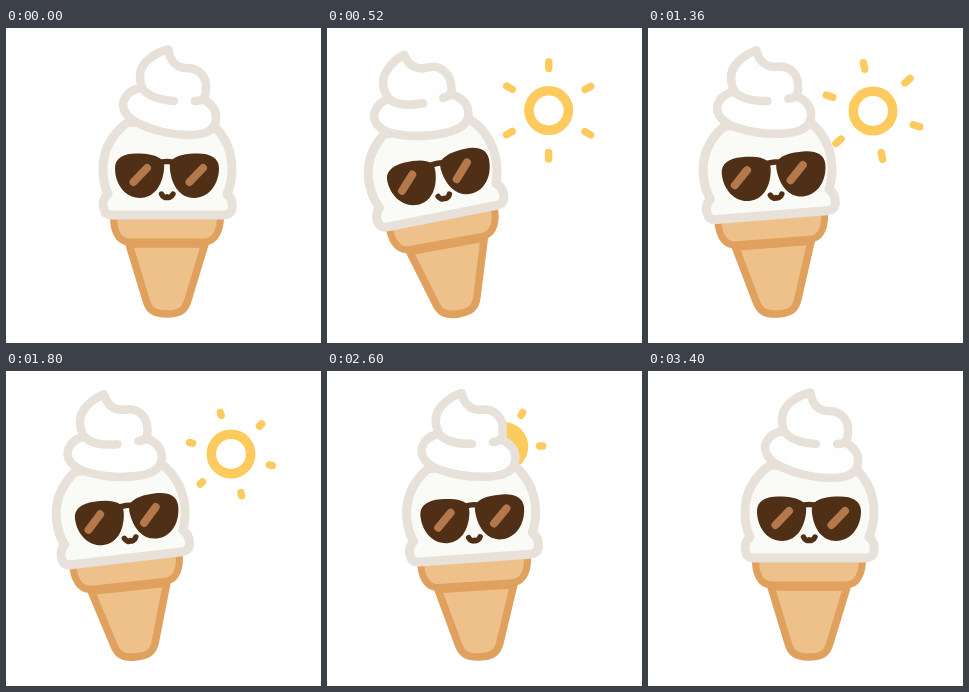
An HTML page with a canvas for the animation above (3440 ms loop, 315 px wide and 315 px high).

```html
<!DOCTYPE html>
<html lang="en">
<head>
<meta charset="utf-8">
<title>Ice cream and sun</title>
<style>
html, body { margin: 0; width: 100%; height: 100%; overflow: hidden; background: #fff; }
canvas { display: block; width: 100vw; height: 100vh; }
</style>
</head>
<body>
<canvas id="stage"></canvas>
<script>
const SIZE = 315, LOOP = 3440, AXIS = 160, GROUND = 288;
const CREAM = '#e8e1da', SUN = '#fdca5d', SHADES = '#4f2f15', GLINT = '#b5784a';
const WAFER = '#eec08a', CRUST = '#dfa15d';

const canvas = document.getElementById('stage');
const ctx = canvas.getContext('2d');

// Shapes of the upright cone; control points are bent before drawing.
const shapes = {
  wafer: 'M123 216 L140 272 C143 283 149 286 161 286 C173 286 179 283 182 272 L199 216 Z',
  rim: 'M107.5 186 C107 201 111 214 124 214 L198 214 C210 214 215 201 214.5 186 Z',
  body: 'M122 94 C106 106 97 121 97 141 C97 152 99 160 102 166 C97 170 96 177 98 182 C99 186 102 187 106 187 L217 187 C222 187 225 185 226 181 C227 175 226 170 221 166 C224 159 226 150 226 141 C226 122 218 107 206 96 Z',
  swirl: 'M162.5 21.5 C164 34 171 40 181 40 C194 40 201 50 200 60 C200 65 199 69 197 71 C206 76 211 82 210 91 C209 103 199 107 184 107 C163 107 142 101 128 93 C119 87 114 78 119 70 C122 64 128 61 136 60 C132 48 134 38 143 31 C149 26 155 23 162.5 21.5 Z',
  fold: 'M136 60 C142 69 154 72 168 73',
  hook: 'M198 71 C195 73 192 73 189 73',
  lens: 'M109 140 C109 130 118 125.5 130 125.5 C142 125.5 151 127 156 132 C158 134 158.5 138 158 142 C156 159 147 170 134 170 C119 170 109 156 109 140 Z',
  bridge: 'M152 135 C157 133 165 133 170 135',
  glint: 'M127.5 154 L141 140',
  smile: 'M155.5 166 C157 169.5 160 170 161 169 C162 170 165.5 169.5 167 166'
};
for (const name in shapes) {
  shapes[name] = shapes[name].match(/[MLCZ][^MLCZ]*/g).map(part => ({
    op: part[0],
    nums: (part.match(/[\d.]+/g) || []).map(Number)
  }));
}

const clamp = v => Math.max(0, Math.min(1, v));
const ease = u => u < 0.5 ? 2 * u * u : 1 - 2 * (1 - u) * (1 - u);
const ramp = (t, start, length) => ease(clamp((t - start) / length));

// The lean grows with height, so the spine is a circular arc.
function bender(baseX, lean) {
  const foot = lean * 8.1 * Math.PI / 180;
  const curl = lean * 0.028 * Math.PI / 180;
  return (x, y) => {
    const h = GROUND - y;
    const mid = foot + curl * h / 2, tilt = foot + curl * h;
    return [
      baseX - h * Math.sin(mid) + (x - AXIS) * Math.cos(tilt),
      GROUND - h * Math.cos(mid) - (x - AXIS) * Math.sin(tilt)
    ];
  };
}

function draw(shape, map, fill, stroke, width) {
  ctx.beginPath();
  for (const { op, nums } of shape) {
    const pts = [];
    for (let i = 0; i < nums.length; i += 2) pts.push(...map(nums[i], nums[i + 1]));
    if (op === 'M') ctx.moveTo(...pts);
    else if (op === 'L') ctx.lineTo(...pts);
    else if (op === 'C') ctx.bezierCurveTo(...pts);
    else ctx.closePath();
  }
  if (fill) {
    ctx.fillStyle = fill;
    ctx.fill();
  }
  if (stroke) {
    ctx.strokeStyle = stroke;
    ctx.lineWidth = width;
    ctx.stroke();
  }
}

function disc(x, y, r, color) {
  ctx.fillStyle = color;
  ctx.beginPath();
  ctx.arc(x, y, r, 0, 2 * Math.PI);
  ctx.fill();
}

function drawSun(t, out) {
  if (out <= 0.01) return;
  const x = AXIS + 65 * out, y = 73 + 10 * out;
  const pulse = Math.cos((t - 600) / 800 * 2 * Math.PI);
  const dist = (43.7 + 2.3 * pulse) * (0.87 + 0.13 * out);
  const half = 2.5 + 0.9 * pulse;
  const turn = (30 + 0.1293 * (t - 520)) * Math.PI / 180;

  disc(x, y, 24.5, SUN);
  disc(x, y, 15 * clamp((out - 0.3) * 2), '#fff');

  ctx.strokeStyle = SUN;
  ctx.lineWidth = 7.4;
  for (let i = 0; i < 6; i++) {
    const a = turn + i * Math.PI / 3, c = Math.cos(a), s = Math.sin(a);
    ctx.beginPath();
    ctx.moveTo(x + c * (dist - half), y + s * (dist - half));
    ctx.lineTo(x + c * (dist + half), y + s * (dist + half));
    ctx.stroke();
  }
}

function drawCone(slide, lean) {
  const bend = bender(AXIS - 31 * slide, lean);
  const face = (x, y) => bend(x + 6.5 * slide, y + slide);
  const mirrored = (x, y) => face(322 - x, y);
  const shifted = (x, y) => bend(x + 56, y);

  draw(shapes.wafer, bend, WAFER, CRUST, 7.6);
  draw(shapes.rim, bend, WAFER, CRUST, 7);
  draw(shapes.body, bend, '#fafaf6', CREAM, 9);
  draw(shapes.swirl, bend, '#fefefe', CREAM, 8.5);
  draw(shapes.fold, bend, null, CREAM, 8.5);
  draw(shapes.hook, bend, null, CREAM, 8.5);

  draw(shapes.lens, face, SHADES);
  draw(shapes.lens, mirrored, SHADES);
  draw(shapes.bridge, face, null, SHADES, 5.5);
  draw(shapes.smile, face, null, SHADES, 5.5);
  // Reflections stay with the body while the face turns.
  draw(shapes.glint, bend, null, GLINT, 8);
  draw(shapes.glint, shifted, null, GLINT, 8);
}

function render(t) {
  const slide = ramp(t, 0, 620) - ramp(t, 2210, 610);
  const tip = ramp(t, 0, 640) - ramp(t, 2250, 590);
  const sway = (1 - Math.cos(clamp((t - 740) / 1520) * 2 * Math.PI)) / 2;

  ctx.setTransform(canvas.width / SIZE, 0, 0, canvas.height / SIZE, 0, 0);
  ctx.fillStyle = '#fff';
  ctx.fillRect(0, 0, SIZE, SIZE);
  ctx.lineCap = ctx.lineJoin = 'round';
  drawSun(t, slide);
  drawCone(slide, tip * (1.1 - 0.74 * sway));
}

function resize() {
  const dpr = window.devicePixelRatio || 1;
  canvas.width = Math.round(innerWidth * dpr);
  canvas.height = Math.round(innerHeight * dpr);
}

const start = performance.now();
function tick() {
  render((performance.now() - start) % LOOP);
  requestAnimationFrame(tick);
}

addEventListener('resize', resize);
resize();
tick();
</script>
</body>
</html>
```
